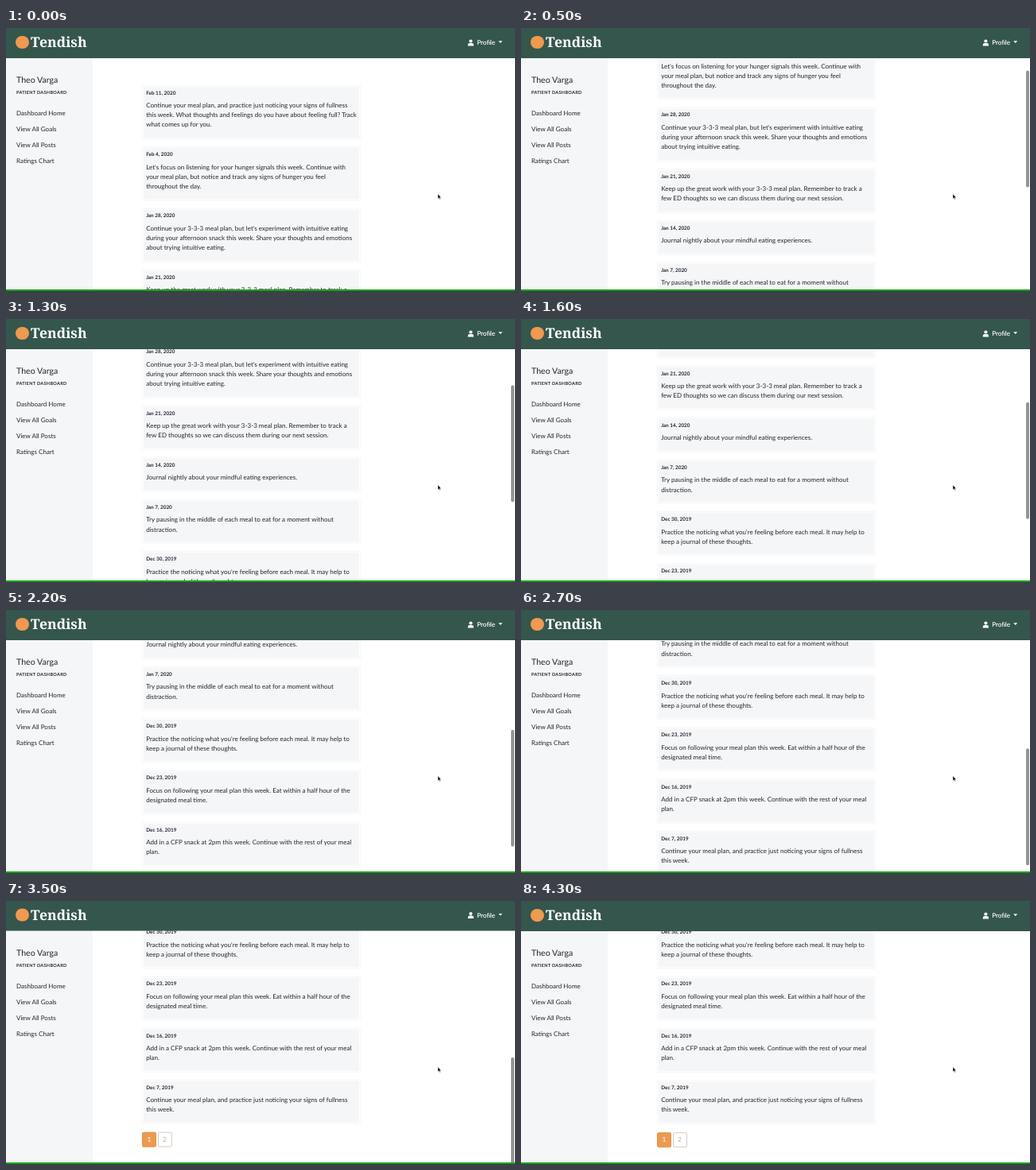
Write an HTML page that moves like this. It is 640 px wide and 331 px high and loops after 4400 ms.

```html
<!DOCTYPE html>
<html lang="en">
<head>
<meta charset="utf-8">
<title>Patient dashboard</title>
<style>
  html, body { margin: 0; width: 100%; height: 100%; overflow: hidden; background: #fff; }
  #stage { position: absolute; left: 0; top: 0; width: 640px; height: 331px; overflow: hidden;
    background: #fff; color: #24282c; font: 8.04px/12.1px Lato, "Open Sans", sans-serif;
    white-space: pre; text-rendering: geometricPrecision; }
  #stage div, #stage svg { position: absolute; }
  #side { left: 0; top: 0; width: 109px; height: 340px; background: #f5f6f8; }
  #side div { left: 13px; }
  .name { top: 60.4px; font-size: 10.6px; line-height: 13px; }
  .role { top: 77.4px; font-size: 5.55px; line-height: 10px; font-weight: 700; letter-spacing: .3px; }
  #list { left: 0; top: 0; width: 640px; height: 800px; }
  .card { left: 171px; width: 275px; box-sizing: border-box; border: 1px solid #f6f6f7; background: #fff; }
  .fill { left: 1px; right: 1px; top: 1px; bottom: 1px; background: #f5f6f8; }
  .date { left: 4.2px; top: 4.8px; font-size: 6.4px; line-height: 10px; font-weight: 700; }
  .note { left: 4.2px; top: 18.3px; }
  .page { top: 749px; height: 19px; box-sizing: border-box; border: 1px solid #d9cdc0; border-radius: 2px;
    color: #c9ab8c; text-align: center; line-height: 17px; font-size: 8.4px; }
  .page.on { background: #ec9a50; border-color: #e39349; color: #fff; }
  #bar { left: 0; top: -2px; width: 640px; height: 39.5px; background: #35564d; color: #fff; }
  .mark { left: 12.3px; top: 11.8px; width: 16.6px; height: 16.6px; border-radius: 50%; background: #f0994f; }
  .brand { left: 31px; top: 8px; font: 700 17.6px/24px "Noto Serif", serif; }
  .user { left: 592.3px; top: 13.6px; -webkit-text-stroke: .15px #fff; }
  #thumb { left: 635.3px; top: 0; width: 3.6px; height: 147px; border-radius: 2px; background: #949494; }
  #edge { left: 0; top: 329px; width: 640px; height: 2px; background: #16a516; }
</style>
</head>
<body>
<div id="stage">
  <div id="list"></div>
  <div id="side">
    <div class="name">Theo Varga</div>
    <div class="role">PATIENT DASHBOARD</div>
  </div>
  <div id="bar">
    <div class="mark"></div>
    <div class="brand">Tendish</div>
    <svg style="left:580px;top:15.5px" width="9" height="9" viewBox="0 0 9 9" fill="#fff">
      <circle cx="4.4" cy="2.5" r="2.1"/><path d="M.8 8.4V7.2Q.8 5.1 2.9 5.1H5.9Q8 5.1 8 7.2V8.4Z"/>
    </svg>
    <div class="user">Profile</div>
    <svg style="left:618.5px;top:18.3px" width="6" height="4" viewBox="0 0 6 4"><path d="M.2 .3H5.2L2.7 2.9Z" fill="#fff"/></svg>
  </div>
  <div id="thumb"></div>
  <svg style="left:542.3px;top:208px" width="7" height="10" viewBox="0 0 7 10">
    <path d="M1 .8V7L2.4 5.8 3.3 7.8 4.3 7.4 3.4 5.4H5.2Z" fill="#000" stroke="#fff" stroke-width=".5"/>
  </svg>
  <div id="edge"></div>
</div>
<script>
const LINE = 12.1, LOOP = 4400, STEP = 100;
const posts = [
  ["Feb 11, 2020", "Continue your meal plan, and practice just noticing your signs of fullness\nthis week. What thoughts and feelings do you have about feeling full? Track\nwhat comes up for you."],
  ["Feb 4, 2020", "Let's focus on listening for your hunger signals this week. Continue with\nyour meal plan, but notice and track any signs of hunger you feel\nthroughout the day."],
  ["Jan 28, 2020", "Continue your 3-3-3 meal plan, but let's experiment with intuitive eating\nduring your afternoon snack this week. Share your thoughts and emotions\nabout trying intuitive eating."],
  ["Jan 21, 2020", "Keep up the great work with your 3-3-3 meal plan. Remember to track a\nfew ED thoughts so we can discuss them during our next session."],
  ["Jan 14, 2020", "Journal nightly about your mindful eating experiences."],
  ["Jan 7, 2020", "Try pausing in the middle of each meal to eat for a moment without\ndistraction."],
  ["Dec 30, 2019", "Practice the noticing what you're feeling before each meal. It may help to\nkeep a journal of these thoughts."],
  ["Dec 23, 2019", "Focus on following your meal plan this week. Eat within a half hour of the\ndesignated meal time."],
  ["Dec 16, 2019", "Add in a CFP snack at 2pm this week. Continue with the rest of your meal\nplan."],
  ["Dec 7, 2019", "Continue your meal plan, and practice just noticing your signs of fullness\nthis week."]
];
const links = ["Dashboard Home", "View All Goals", "View All Posts", "Ratings Chart"];

// Scroll position over time: [ms, px]
const keys = [[0, 0], [100, 6], [350, 84], [600, 144], [700, 148], [800, 148], [1000, 158],
  [1600, 245.4], [2200, 351.2], [2700, 405.4], [3200, 457.8], [LOOP, 457.8]];

const $ = id => document.getElementById(id);
const list = $("list"), side = $("side"), bar = $("bar"), thumb = $("thumb");

function add(parent, cls, text = "", style = {}) {
  const el = document.createElement("div");
  el.className = cls;
  el.textContent = text;
  Object.assign(el.style, style);
  parent.append(el);
  return el;
}

let y = 72;
for (const [date, note] of posts) {
  const text = LINE * note.split("\n").length;
  const card = add(list, "card", "", { top: y + "px", height: 31.7 + text + "px" });
  add(card, "fill");
  add(card, "date", date);
  add(card, "note", note);
  y += 41 + text;
}
add(list, "page on", "1", { left: "171px", width: "18px" });
add(list, "page", "2", { left: "190.5px", width: "18px" });
links.forEach((text, i) => add(side, "link", text, { top: 101.2 + i * 20 + "px" }));

// Monotone cubic through the keys
const slope = i => (keys[i + 1][1] - keys[i][1]) / (keys[i + 1][0] - keys[i][0]);
function tangent(i) {
  if (i === 0 || i === keys.length - 1) return 0;
  const a = slope(i - 1), b = slope(i);
  return a * b <= 0 ? 0 : 2 * a * b / (a + b);
}
function scrollAt(t) {
  let i = 0;
  while (i < keys.length - 2 && t >= keys[i + 1][0]) i++;
  const [t0, a] = keys[i], [t1, b] = keys[i + 1], d = t1 - t0, u = (t - t0) / d, v = 1 - u;
  return a * (1 + 2 * u) * v * v + tangent(i) * d * u * v * v
    + b * u * u * (3 - 2 * u) - tangent(i + 1) * d * u * u * v;
}

const clamp = x => Math.min(1, Math.max(0, x));
const shift = (el, dy) => { el.style.transform = `translateY(${dy}px)`; };

function draw(now) {
  const t = Math.floor(now % LOOP / STEP) * STEP;
  const pos = scrollAt(t);
  const bounce = t >= 3200 && t < 3800 ? -0.5 : 0;
  shift(list, bounce - pos);
  shift(side, bounce);
  shift(bar, bounce);
  shift(thumb, pos * 0.433 - 1.4);
  thumb.style.opacity = clamp(t / 100) * clamp((4200 - t) / 300);
}

let start;
function loop(now) {
  start ??= now;
  draw(now - start);
  requestAnimationFrame(loop);
}
draw(0);
requestAnimationFrame(loop);
</script>
</body>
</html>
```
